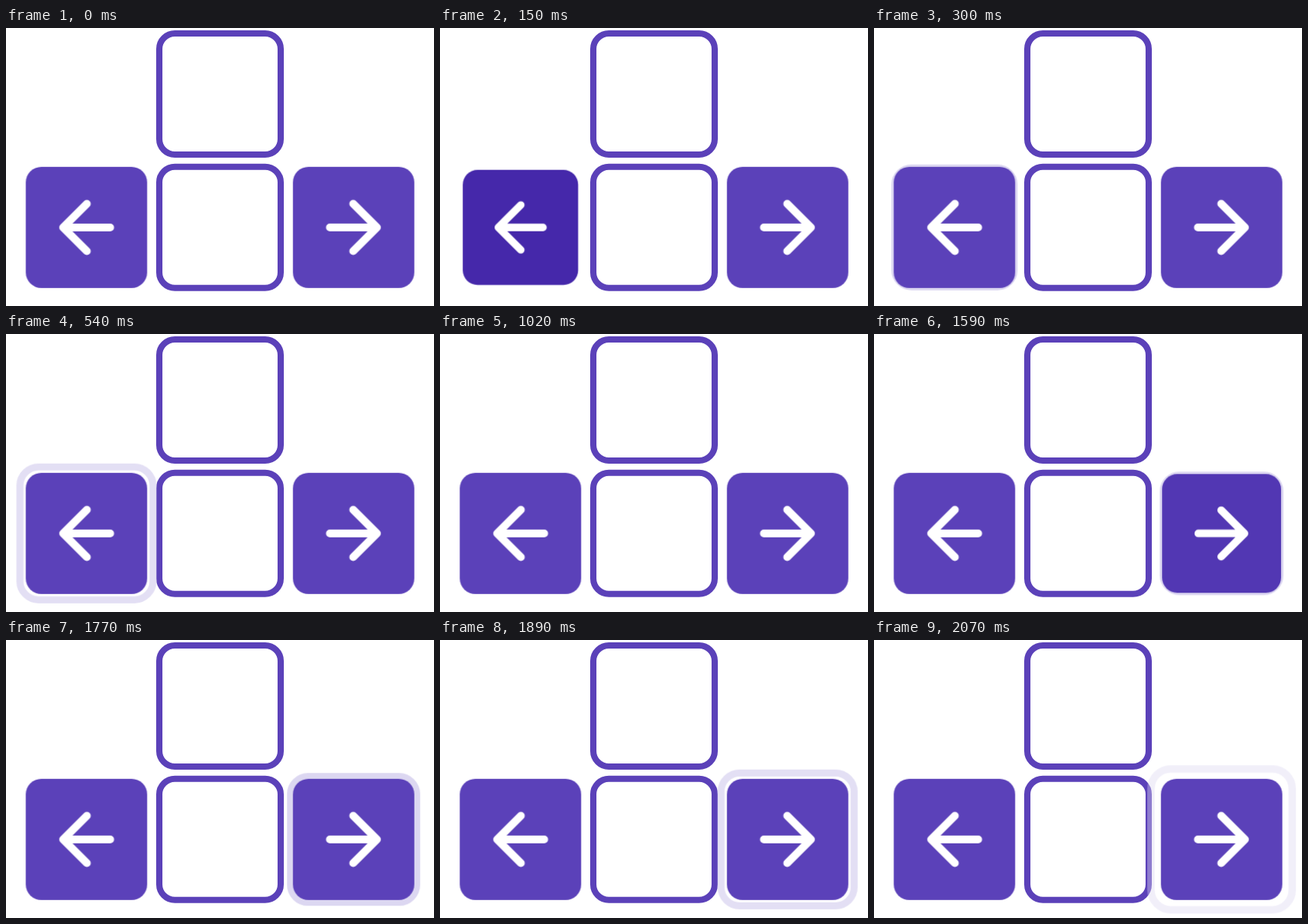
These frames come from a looping animation (550 by 358 pixels, 2700 ms). An HTML page without scripts:

```html
<!DOCTYPE html>
<html lang="en">
<head>
<meta charset="utf-8">
<title>Arrow keys</title>
<style>
  html, body { margin: 0; width: 100%; height: 100%; overflow: hidden; background: #fff; }
  svg { display: block; width: 100%; height: 100%; }

  .key, .ring, .halo { animation: 2700ms linear infinite; }
  .right * { animation-delay: -1350ms; }

  .key { fill: #5b41b9; animation-name: press; }
  .arrow { fill: none; stroke: #fff; stroke-width: 10; stroke-linecap: round; stroke-linejoin: round; }
  .ring { fill: none; stroke: #dcd7f1; stroke-width: 9; animation-name: grow, fade; }
  .halo { animation-timing-function: step-end; }
  .left .halo { animation-name: show-brief; }
  .right .halo { animation-name: show-long; }
  .slot { fill: #fff; stroke: #5b41b9; stroke-width: 8; }

  @keyframes press {
    0%, 11.1111%, 100% { transform: scale(1); fill: #5b41b9; }
    5.5556% { transform: scale(.95); fill: #4528aa; }
  }
  @keyframes grow {
    0%, 5.5556% { transform: scale(.822); }
    8.8889% { transform: scale(.883); }
    11.1111% { transform: scale(.9); }
    15.5556% { transform: scale(.95); }
    20% { transform: scale(1); }
    26.6667%, 100% { transform: scale(1.061); }
  }
  @keyframes fade {
    0%, 5.5556% { opacity: 0; }
    8.8889%, 16.6667% { opacity: 1; }
    26.6667%, 100% { opacity: .4; }
  }
  /* the left ring vanishes early, the right one lingers until the loop restarts */
  @keyframes show-brief {
    0% { visibility: visible; }
    26.6667%, 100% { visibility: hidden; }
  }
  @keyframes show-long {
    0% { visibility: visible; }
    50%, 100% { visibility: hidden; }
  }
</style>
</head>
<body>
<svg viewBox="0 0 550 358">
  <defs>
    <rect id="tile" x="-78" y="-78" width="156" height="156" rx="20"/>
    <path id="arrow" d="M30.5 0H-30M.5-30.5L-30 0L.5 30.5"/>
  </defs>

  <use class="slot" href="#tile" x="275" y="85"/>
  <use class="slot" href="#tile" x="275" y="256.8"/>

  <g class="left" transform="translate(103.4 256.8)">
    <g class="halo"><rect class="ring" x="-85.5" y="-85.5" width="171" height="171" rx="24"/></g>
    <g class="key">
      <use href="#tile"/>
      <use class="arrow" href="#arrow"/>
    </g>
  </g>

  <g class="right" transform="translate(446.7 256.8) scale(-1 1)">
    <g class="halo"><rect class="ring" x="-85.5" y="-85.5" width="171" height="171" rx="24"/></g>
    <g class="key">
      <use href="#tile"/>
      <use class="arrow" href="#arrow"/>
    </g>
  </g>
</svg>
</body>
</html>
```
